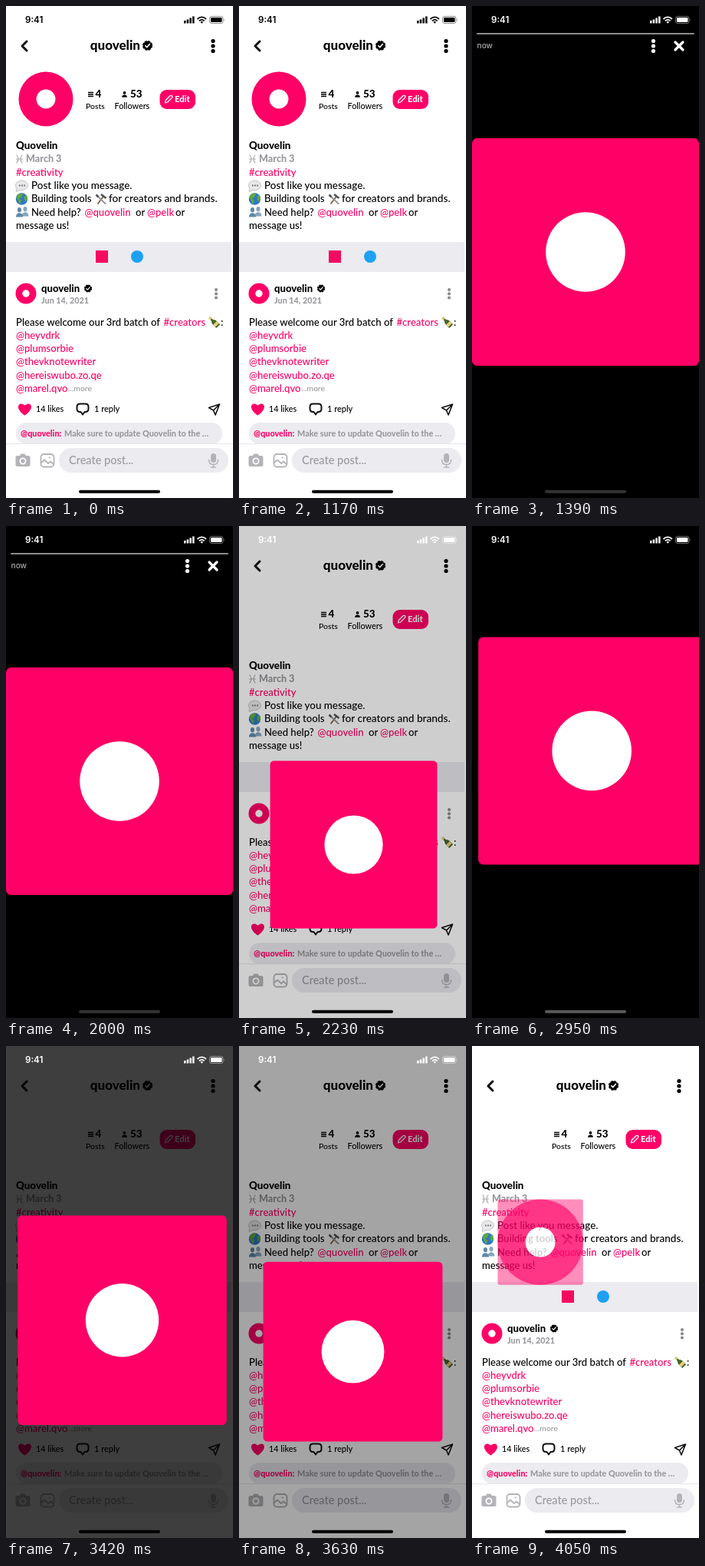
An HTML page for the animation above (4.14 s loop, 296 px wide and 640 px high).

```html
<!DOCTYPE html>
<html lang="en">
<head>
<meta charset="utf-8">
<title>Profile story</title>
<style>
  html, body { margin: 0; width: 100%; height: 100%; overflow: hidden; background: #fff; }
  svg { display: block; width: 100vw; height: 100vh; }
  text { font: 500 13.1px Lato, "Open Sans", sans-serif; white-space: pre; }
  .b { font-weight: 800; }
  .pink { fill: #ff0066; }
  .grey { fill: #99999e; }
  .soft { fill: #ebebf0; }
  .white { fill: #fff; }
  .line { fill: none; stroke: #111; stroke-width: 2; stroke-linecap: round; stroke-linejoin: round; }
  .s10 { font-size: 10.8px; }
  .sf { font-family: Inter, sans-serif; }
</style>
</head>
<body>
<svg viewBox="0 0 296 640">
  <defs>
    <g id="dots"><circle cy="-6.5" r="2.6"/><circle r="2.6"/><circle cy="6.5" r="2.6"/></g>
    <g id="badge">
      <circle r="5.7"/>
      <circle r="5.7" fill="none" stroke="#000" stroke-width="1.8" stroke-dasharray="3 1.48"/>
      <path d="M-2.7 .2 -.8 2.1 2.9 -2" class="line" style="stroke:#fff;stroke-width:1.6"/>
    </g>
    <g id="avatar"><circle r=".5" class="pink"/><circle r=".175" class="white"/></g>
    <g id="person"><circle cy="-3" r="2.8"/><path d="M-5 5.5C-5-1 5-1 5 5.5Z"/></g>
  </defs>

  <g id="page">
    <path class="line" style="stroke-width:3" d="M27 46 21 52 27 58"/>
    <text class="b" x="175" y="57" text-anchor="end" style="font-size:17px">quovelin</text>
    <use href="#badge" x="184.5" y="51.5"/>
    <use href="#dots" x="270" y="52"/>

    <use href="#avatar" id="profile" transform="translate(52 121) scale(71)"/>
    <path d="M107 112.5h7M107 115h7M107 117.5h7" stroke="#000" stroke-width="1.4"/>
    <text class="b" x="116.5" y="119" style="font-size:13.4px">4</text>
    <text x="104" y="134" style="font-size:10.4px">Posts</text>
    <use href="#person" transform="translate(154.5 115) scale(.68)"/>
    <text class="b" x="162" y="119" style="font-size:13.4px">53</text>
    <text class="s10" x="141.5" y="134">Followers</text>
    <rect class="pink" x="200.5" y="109" width="46.5" height="25" rx="9"/>
    <path d="M207.5 126 208.3 122.5 214 116.8Q215.5 115.8 216.5 117T216.4 119.4L210.8 125Z" class="line" style="stroke:#fff;stroke-width:1.3"/>
    <text class="b white" x="220" y="125" style="font-size:11.2px">Edit</text>

    <text class="b" x="13" y="186" style="font-size:13.4px">Quovelin</text>
    <path d="M14 194Q18 199 14 204M21 194Q17 199 21 204M13.5 199h8" class="line" style="stroke:#aaa;stroke-width:1.2"/>
    <text class="b grey" x="26" y="203" style="font-size:12.6px">March 3</text>
    <text class="pink" x="13" y="220.5">#creativity</text>
    <path d="M14 237 13 241.5 19 239.5A8 6.3 0 1 0 14 237Z" fill="#e8e8ea" stroke="#b9b9bd" stroke-width=".8"/>
    <path d="M17 233.5h8" stroke="#777" stroke-width="1.8" stroke-dasharray="1.8 1.3"/>
    <text x="33" y="238" style="font-size:13.4px">Post like you message.</text>
    <circle cx="20.5" cy="251" r="7.7" fill="#2b78c9"/>
    <path d="M15 246Q19 242 22 245L20 249 17 250 20 253 18.5 258Q16 256 15.5 252L13.5 250ZM24 247 27 246 28 251 25.5 255 23.5 251Z" fill="#62a83c"/>
    <text x="33" y="255">Building tools</text>
    <path d="M119.5 257.5 127.5 247" stroke="#8a5a35" stroke-width="1.8"/>
    <path d="M119 247 129.5 257" stroke="#8f979c" stroke-width="2" stroke-linecap="round"/>
    <path d="M124 245 130.5 250M117.5 245.5 120.5 248.5" stroke="#4b5358" stroke-width="2.6"/>
    <text x="134" y="255" style="font-size:13.6px">for creators and brands.</text>
    <g fill="#5d89a8">
      <use href="#person" transform="translate(25 267.5) scale(.9 1.1)" opacity=".75"/>
      <use href="#person" transform="translate(17.5 268.5) scale(.9 1.1)"/>
    </g>
    <text x="33" y="272.5">Need help? <tspan x="102.5" class="pink">@quovelin</tspan><tspan x="169">or</tspan><tspan x="184" class="pink">@pelk</tspan><tspan x="221">or</tspan></text>
    <text x="13" y="290">message us!</text>

    <rect class="soft" y="307" width="294" height="39"/>
    <rect x="117" y="318" width="16" height="16" fill="#f50a61"/>
    <circle cx="171" cy="326" r="8" fill="#1da1f2"/>

    <use href="#avatar" transform="translate(26 374) scale(27)"/>
    <text class="b" x="46" y="372">quovelin</text>
    <use href="#badge" transform="translate(107 367.5) scale(.77)"/>
    <text class="b grey s10" x="46" y="386.5">Jun 14, 2021</text>
    <use href="#dots" transform="translate(274 374.3) scale(.8)" fill="#8a8a8a"/>

    <text x="13" y="416">Please welcome our 3rd batch of <tspan class="pink" x="205.5">#creators</tspan><tspan x="280">:</tspan></text>
    <g transform="translate(271 411) rotate(-45)">
      <path d="M-1.4-8h2.8v5Q3.4-1 3.4 1v7h-6.8V1Q-3.4-1-1.4-3Z" fill="#47662c"/>
      <path d="M-1.5-8.5h3v3.5h-3ZM-3.4 2h6.8v4h-6.8Z" fill="#e5cf78"/>
    </g>
    <g class="pink" id="handles"></g>
    <text class="grey" x="81" y="501" style="font-size:10.4px">...more</text>

    <path class="pink" d="M24.5 532.5C10 523 17 513 24.5 519.5 32 513 39 523 24.5 532.5Z"/>
    <text class="s10" x="39" y="528">14 likes</text>
    <path class="line" d="M96.5 517.5h7q4 0 4 4v2.5q0 4-4 4h-1l-2.5 3.5-2.5-3.5h-1q-4 0-4-4v-2.5q0-4 4-4Z"/>
    <text x="115" y="528" style="font-size:11px">1 reply</text>
    <path class="line" style="stroke-width:1.6" d="M264.5 522.5 278.5 518 273 532 270.5 526ZM270.5 526 278 518.5"/>

    <rect class="soft" x="13" y="542" width="269" height="28" rx="14"/>
    <text class="b grey s10" x="19" y="560"><tspan class="pink">@quovelin:</tspan><tspan x="76">Make sure to update Quovelin to the …</tspan></text>

    <rect class="white" y="569.5" width="296" height="71"/>
    <path d="M0 569.5h296" stroke="#e6e6ea"/>
    <path d="M15 585h3l1.5-2.5h5L26 585h3q2.5 0 2.5 2.5v9q0 2.5-2.5 2.5H15q-2.5 0-2.5-2.5v-9q0-2.5 2.5-2.5Z" fill="#b4b4b8"/>
    <circle cx="22" cy="592" r="3.6" fill="#b4b4b8" stroke="#fff" stroke-width="1.7"/>
    <g class="line" style="stroke:#b4b4b8;stroke-width:1.8">
      <rect x="45.5" y="583" width="17" height="16.5" rx="4"/>
      <path d="M46 594 50 590.5 55 595 58 592.5 62 596M56.5 587.5h.5"/>
    </g>
    <rect class="soft" x="69" y="575" width="221" height="32" rx="16"/>
    <text class="grey" x="82" y="596" style="font-size:14.5px">Create post...</text>
    <rect x="267" y="582" width="7" height="12" rx="3.5" fill="#b4b4b8"/>
    <path class="line" style="stroke:#b4b4b8;stroke-width:1.5" d="M264.5 590.5q0 6 6 6t6-6M270.5 597v3M267.5 600h6"/>
  </g>

  <rect id="dim" width="296" height="640"/>

  <g id="status">
    <text class="sf" x="25" y="22" style="font-size:11.6px;font-weight:600">9:41</text>
    <path d="M232 19h2.5v3.5h-2.5ZM235.7 17.5h2.5v5h-2.5ZM239.4 15.5h2.5v7h-2.5ZM243.1 13.5h2.5v9h-2.5Z"/>
    <path d="M249.5 17Q255.3 11.8 261 17M251.8 19.3Q255.3 16.3 258.7 19.3" fill="none" stroke="currentColor" stroke-width="1.7"/>
    <path d="M253.3 20.8Q255.3 19.3 257.2 20.8L255.3 22.8Z"/>
    <rect x="265.5" y="13.5" width="17.5" height="9" rx="2.5" fill="none" stroke="currentColor" stroke-opacity=".45"/>
    <rect x="267" y="15" width="14.5" height="6" rx="1.3"/>
    <path d="M284 16.5q1.5 1.5 0 3Z" opacity=".5"/>
  </g>
  <rect id="home" x="95" y="629.8" width="106" height="4" rx="2"/>

  <g id="tile">
    <g id="square"><rect x="-.5" y="-.5" width="1" height="1" rx=".022" class="pink"/><circle r=".175" class="white"/></g>
    <use id="round" href="#avatar"/>
  </g>

  <g id="controls">
    <rect x="6" y="35" width="284" height="2" rx="1" fill="#8c8c8c"/>
    <text class="sf" x="6.5" y="55" fill="#aaa" style="font-size:10.2px">now</text>
    <use href="#dots" x="236.5" y="52" class="white"/>
    <path class="line" style="stroke:#fff;stroke-width:3.2" d="M265 47 275 57M275 47 265 57"/>
  </g>
</svg>
<script>
const LOOP = 4140, FULL = 296, AVATAR = { x: 52, y: 121, size: 71 };
const OPEN = 1170, SHOWN = 1390, DRAG = 2000, RELEASE = 3850;

// The picture holds its pose between these times.
const steps = [0, 1170, 1280, 1390, 2000, 2110, 2220, 2330, 2440, 2550, 2780, 2950,
  3200, 3310, 3420, 3530, 3630, 3740, 3850, 3960, 4050];

// Finger drag: time, centre x, centre y.
const drag = [[1390, 148, 320], [1900, 148, 320], [2000, 148, 332], [2440, 151, 497],
  [2550, 154.5, 489.5], [2950, 156.2, 292.4], [3090, 156.2, 292.4], [3630, 148.5, 397.7], [3850, 150, 475]];

const $ = id => document.getElementById(id);
const clamp = v => Math.min(1, Math.max(0, v));
const mix = (a, b, p) => a + (b - a) * p;

$('handles').innerHTML = ['@heyvdrk', '@plumsorbie', '@thevknotewriter', '@hereiswubo.zo.qe', '@marel.qvo']
  .map((name, i) => `<text x="13" y="${433 + i * 17.2}">${name}</text>`).join('');

// Pulling down shrinks the tile and clears the backdrop.
function dragged(t) {
  const i = Math.max(1, drag.findIndex(k => k[0] >= t));
  const [a, b] = [drag[i - 1], drag[i]];
  const p = clamp((t - a[0]) / (b[0] - a[0]));
  const y = mix(a[2], b[2], p), pull = Math.max(0, y - 332);
  return { x: mix(a[1], b[1], p), y, size: FULL * Math.max(.6, 1 - pull * .0032), dim: clamp(1 - pull / 102) };
}

function pose(t) {
  const back = t < SHOWN ? 1 - (t - OPEN) * 1.3 / (SHOWN - OPEN)
    : clamp((t - RELEASE) / 322);
  const from = dragged(Math.min(Math.max(t, SHOWN), RELEASE));
  return {
    x: mix(from.x, AVATAR.x, back),
    y: mix(from.y, AVATAR.y, back),
    size: mix(from.size, AVATAR.size, back),
    dim: from.dim * (1 - back),
    back
  };
}

function draw(now) {
  const time = now % LOOP;
  const t = steps.filter(s => s <= time).pop();
  const active = t > OPEN;
  const controls = t >= SHOWN && t <= DRAG;
  const { x, y, size, dim, back } = pose(t);

  $('profile').style.display = active ? 'none' : '';
  $('tile').style.display = active ? '' : 'none';
  $('tile').setAttribute('transform', `translate(${x} ${y}) scale(${size})`);
  $('square').setAttribute('opacity', 1 - .9 * back);
  $('round').setAttribute('opacity', back);
  $('dim').setAttribute('opacity', active ? dim : 0);
  $('status').style.fill = $('status').style.color = active ? '#fff' : '#000';
  $('home').style.fill = !active || dim < .95 ? '#000' : controls ? '#333' : '#5a5a5a';
  $('controls').style.display = controls ? '' : 'none';
}

const start = performance.now();
function frame() {
  draw(performance.now() - start);
  requestAnimationFrame(frame);
}
frame();
</script>
</body>
</html>
```
